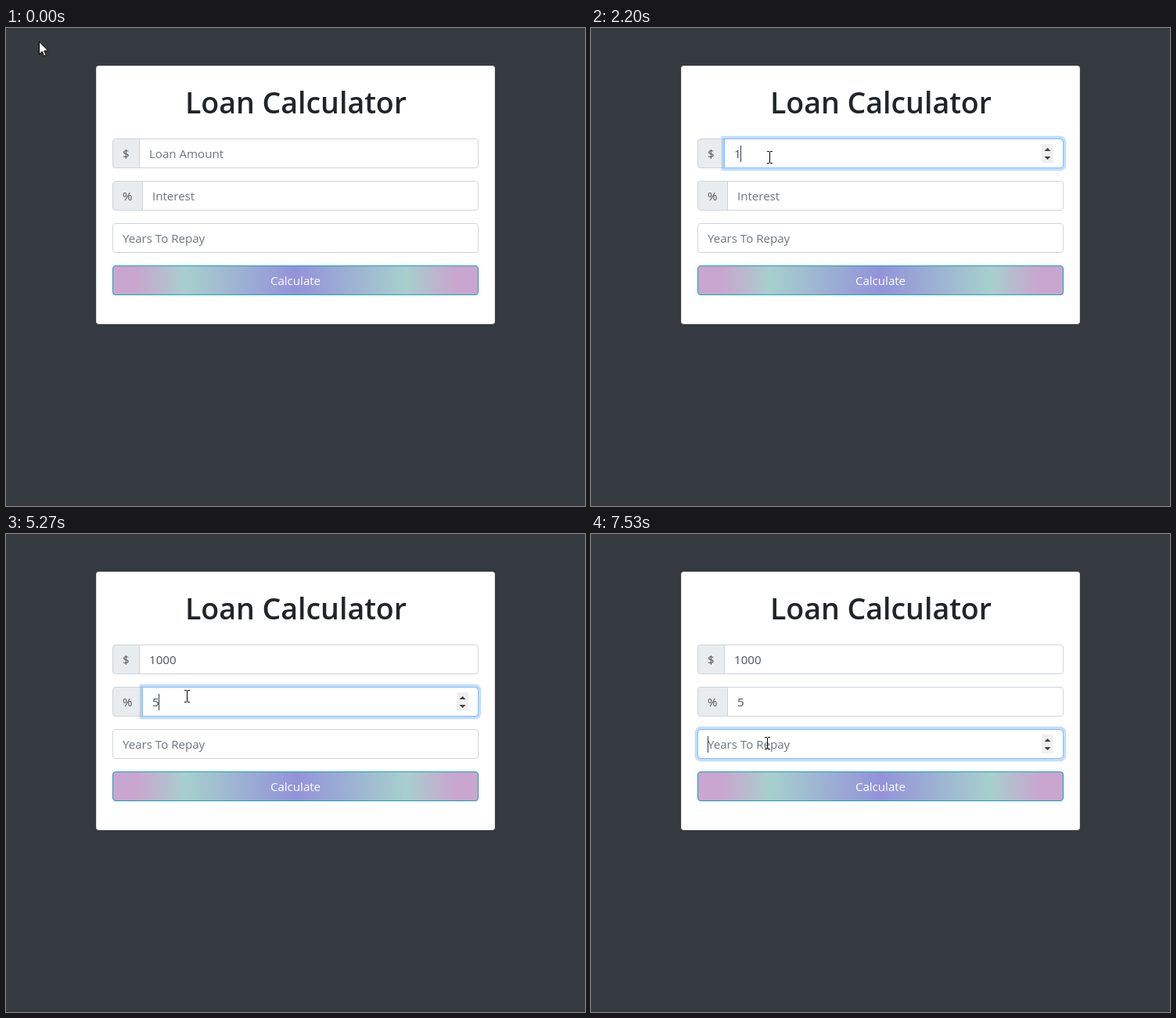
An HTML page that plays this animation: 740x610 px, repeating every 8 s.

```html
<!DOCTYPE html>
<html lang="en">
<head>
<meta charset="utf-8">
<title>Loan Calculator</title>
<style>
  html, body { margin: 0; width: 100%; height: 100%; overflow: hidden; background: #343a40; }
  svg { display: block; }
  text { font: 15.1px "Open Sans", "Noto Sans", sans-serif; fill: #495057; white-space: pre; }
  .title { font-size: 37.5px; font-weight: 600; fill: #212529; }
  .mid { text-anchor: middle; }
  .hint { fill: #6c757d; }
  .line { stroke: #ced4da; }
</style>
</head>
<body>
<svg width="740" height="610" viewBox="0 0 740 610">
  <defs>
    <linearGradient id="sheen">
      <stop offset=".065" stop-color="#c9a6cf"/>
      <stop offset=".2" stop-color="#a7cfcd"/>
      <stop offset=".5" stop-color="#9393da"/>
      <stop offset=".8" stop-color="#a7cfcd"/>
      <stop offset=".935" stop-color="#c9a6cf"/>
    </linearGradient>
  </defs>
  <rect x="115" y="48" width="510" height="330" rx="4" fill="#fff"/>
  <rect x="115.5" y="48.5" width="509" height="329" rx="3.5" fill="none" stroke="#000" stroke-opacity=".125"/>
  <text class="title mid" x="370.5" y="109">Loan Calculator</text>
  <g id="rows"></g>
  <rect x="136.5" y="303.5" width="467" height="37" rx="3.5" fill="url(#sheen)" stroke="#17a2b8"/>
  <text class="mid" x="370" y="328" style="fill:#fff">Calculate</text>
  <rect id="caret" width="1" height="21" fill="#343a40"/>
  <path id="arrow" d="M.5 .5v16l3.7-3.5 2.5 5.6 2.4-1-2.4-5.5h5z" fill="#fff" stroke="#000"/>
  <path id="beam" d="M-3-8h3v1h1v-1h3v1h-3v14h3v1h-3v-1h-1v1h-3v-1h3v-14h-3z"/>
</svg>
<script>
const $ = id => document.getElementById(id);
const LOOP = 8000, FRAME = 1000 / 15, DIGIT = 8.56;

const rows = [
  { x: 170, y: 141, unit: '$', hint: 'Loan Amount', focus: 690, typed: '1000', keys: [2200, 2470, 2670, 2870] },
  { x: 174, y: 195, unit: '%', hint: 'Interest', focus: 4050, typed: '5', keys: [5270] },
  { x: 136, y: 249, unit: '', hint: 'Years To Repay', focus: 6440, typed: '', keys: [] }
];
const blinks = [730, 1200, 1800, 3400, 3930, 4600, 5130, 5800, 6270, 7000, 7530];
// start, end, from x, from y, to x, to y
const moves = [
  [70, 530, 42, 17, 228, 165],
  [3400, 3800, 228, 165, 231, 207],
  [6000, 6270, 231, 207, 225, 267]
];

const ease = p => (p = Math.min(1, Math.max(0, p)), p * p * (3 - 2 * p));
const passed = (times, t) => times.filter(s => s <= t).length;

// Outline of a field from x to x2, with each side rounded or square
function box(x, x2, y, left, right) {
  const corner = (r, dx, dy) => r ? `a${r} ${r} 0 0 1 ${dx * r} ${dy * r}` : '';
  const l = left ? 3.5 : 0, r = right ? 3.5 : 0;
  return `M${x + .5 + l} ${y + .5}H${x2 - .5 - r}${corner(r, 1, 1)}v${37 - 2 * r}${corner(r, -1, 1)}` +
    `H${x + .5 + l}${corner(l, -1, -1)}v${2 * l - 37}${corner(l, 1, -1)}z`;
}

$('rows').innerHTML = rows.map(({ x, y, unit }) => {
  const field = box(x, 604, y, !unit, true);
  const addon = unit && `<path class="line" d="${box(136, x + 1, y, true, false)}" fill="#e9ecef"/>
    <text x="149" y="${y + 25}">${unit}</text>`;
  return `<g>${addon}
    <path class="ring" d="${field}" fill="none" stroke="#007bff"/>
    <path class="line" d="${field}" fill="#fff"/>
    <path class="glow" d="${field}" fill="none" stroke="#80bdff"/>
    <text class="value" x="${x + 13}" y="${y + 25}"></text>
    <g class="spin"><rect x="576" y="${y + 7}" width="15" height="24" fill="#f0f0f0"/>
      <path d="M579.5 ${y + 16}l4-4 4 4zm0 7h8l-4 4z" fill="#404040"/></g>
  </g>`;
}).join('');
rows.forEach((row, i) => {
  const g = $('rows').children[i];
  for (const name of ['ring', 'glow', 'value', 'spin']) row[name] = g.querySelector('.' + name);
});

const show = (el, on) => el.setAttribute('visibility', on ? 'visible' : 'hidden');

function pointer(t) {
  const [a, b, x, y, x2, y2] = moves.filter((m, i) => !i || t > m[0]).pop();
  const p = ease((t - a) / (b - a));
  return [Math.round(x + (x2 - x) * p), Math.round(y + (y2 - y) * p)];
}

function draw(now) {
  const t = Math.round(Math.floor((now % LOOP + 4) / FRAME) * FRAME / 10) * 10;
  const [px, py] = pointer(t);
  const active = passed(rows.map(r => r.focus), t) - 1;
  const hover = rows.findIndex(r => px >= r.x && py >= r.y && py < r.y + 38);

  rows.forEach((row, i) => {
    const next = rows[i + 1];
    const glow = ease((t - row.focus) / 150) - (next ? ease((t - next.focus) / 150) : 0);
    row.ring.setAttribute('stroke-width', 1 + 6.4 * glow);
    row.ring.setAttribute('stroke-opacity', .25 * glow);
    row.glow.setAttribute('stroke-opacity', glow);
    const text = row.typed.slice(0, passed(row.keys, t));
    row.value.textContent = text || row.hint;
    row.value.classList.toggle('hint', !text);
    show(row.spin, i === active || i === hover);
    if (i === active) {
      $('caret').setAttribute('x', Math.floor(row.x + 13 + text.length * DIGIT));
      $('caret').setAttribute('y', row.y + 9);
    }
  });

  show($('caret'), passed(blinks, t) % 2);
  show($('arrow'), hover < 0);
  show($('beam'), hover >= 0);
  for (const id of ['arrow', 'beam']) $(id).setAttribute('transform', `translate(${px} ${py})`);
  requestAnimationFrame(draw);
}
draw(0);
</script>
</body>
</html>
```
